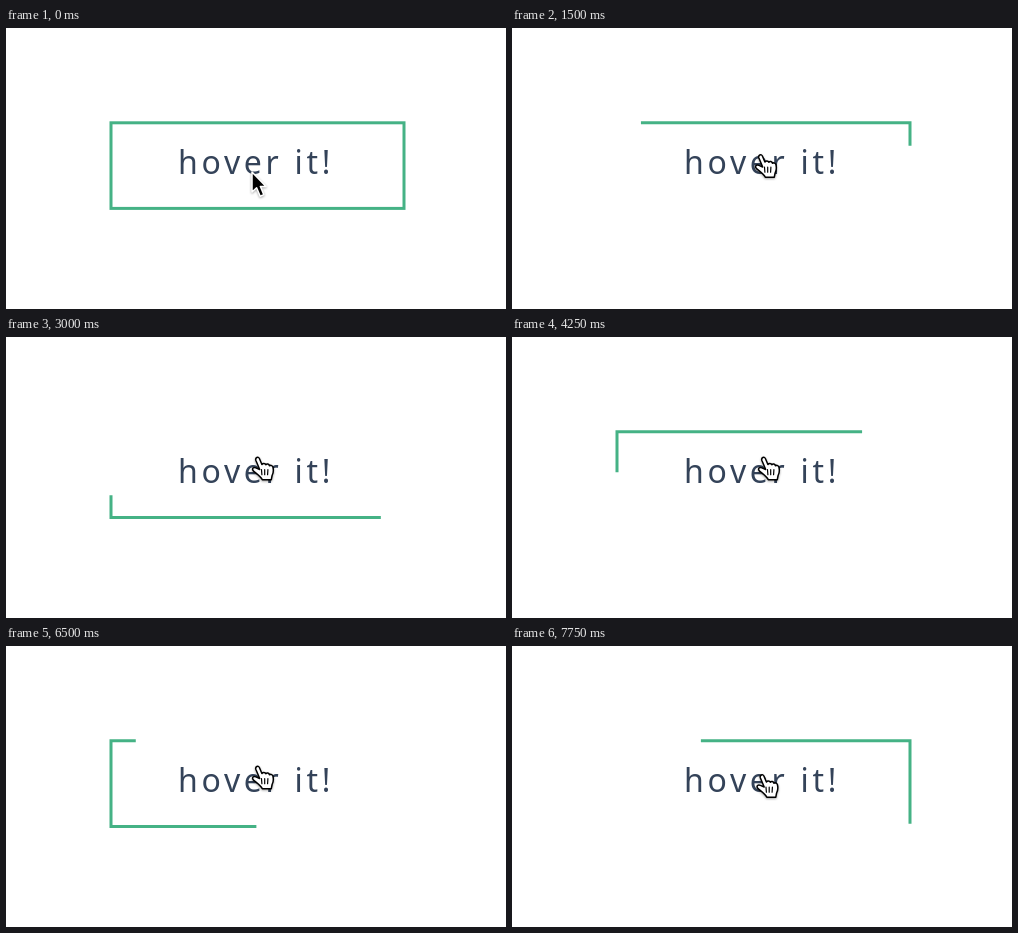
Animation, 500 px wide and 281 px high, one loop 8000 ms. Source, as an HTML page:

```html
<!DOCTYPE html>
<html lang="en">
<head>
<meta charset="utf-8">
<title>Hover border</title>
<style>
  html, body { margin: 0; width: 100%; height: 100%; overflow: hidden; background: #fff; }
  svg { display: block; width: 500px; height: 281px; }
  text { font: 32px "Noto Sans", "Open Sans", sans-serif; letter-spacing: 3.7px; fill: #344359; }
  #border { fill: none; stroke: #45b285; stroke-width: 3; }
  .cursor { filter: drop-shadow(0 1px 1px rgba(0, 0, 0, .35)); stroke-linejoin: round; }
</style>
</head>
<body>
<svg viewBox="0 0 500 281">
  <rect id="border" x="105" y="94.8" width="293" height="85.6"/>
  <text x="172" y="146">hover it!</text>
  <g id="arrow" class="cursor">
    <path d="M0 0V20L4.6 15.8L8.2 24.2L11.8 22.6L8.4 14.4H14Z" fill="#000" stroke="#fff" stroke-width="1.5"/>
  </g>
  <g id="hand" class="cursor" fill="#fff" stroke="#000" stroke-width="1.5" stroke-linecap="round">
    <g transform="translate(0 -2)">
      <path d="M3.2 13L-.6 4C-1.6 1.2 1.8-.6 3 2.2L5.4 8C6.4 6.4 8.6 6.6 9.3 8.2C10.4 7 12.4 7.4 13 9.2C14.4 8.4 16.2 9.2 16.5 11C17.2 14.2 16.8 16.8 15.6 19L14.8 23.2H5.8C4 19.8 .2 17.4-3.2 14.4C-5 12.2-2.8 10-.6 11.4Z"/>
      <path d="M5 13.2L5.4 18.2M8.2 13.2V18.2M11.4 13.2L11.1 18.2" fill="none" stroke-width="1.2"/>
    </g>
  </g>
</svg>
<script>
const LOOP = 8000, TICK = 250;
const HOVER = 1405, LAP = 3006;
const PERIMETER = 2 * (293 + 85.6), DASH = 292;
const [border, arrow, hand] = ['border', 'arrow', 'hand'].map(id => document.getElementById(id));

const clamp = v => Math.min(1, Math.max(0, v));
const ramp = (t, from, to) => clamp((t - from) / (to - from));

function drawBorder(t) {
  if (t < HOVER) {
    border.style.strokeDasharray = 'none';
    return;
  }
  const phase = (t - HOVER) / LAP % 1;
  const start = phase * PERIMETER;
  // The next dash enters at the top left during the last third of a lap.
  const head = DASH * ramp(phase, 2 / 3, 1);
  border.style.strokeDasharray = [head, start - head, DASH, 2 * PERIMETER].join(' ');
}

// The pointer rises to the text, settles a little higher, then drops back.
function drawPointer(t) {
  const rise = ramp(t, 0, 1000), settle = ramp(t, 1500, 2000), drop = ramp(t, 7000, 7750);
  const x = 246 + 1.5 * rise + 3 * settle - 1.5 * drop;
  const y = 144 - 16 * rise - 6.5 * settle + 8.5 * drop;
  const over = t >= HOVER;
  arrow.style.display = over ? 'none' : '';
  hand.style.display = over ? '' : 'none';
  (over ? hand : arrow).setAttribute('transform', `translate(${x} ${y})`);
}

const origin = performance.now();
function frame() {
  const t = Math.floor((performance.now() - origin) % LOOP / TICK) * TICK;
  drawBorder(t);
  drawPointer(t);
  requestAnimationFrame(frame);
}
frame();
</script>
</body>
</html>
```
